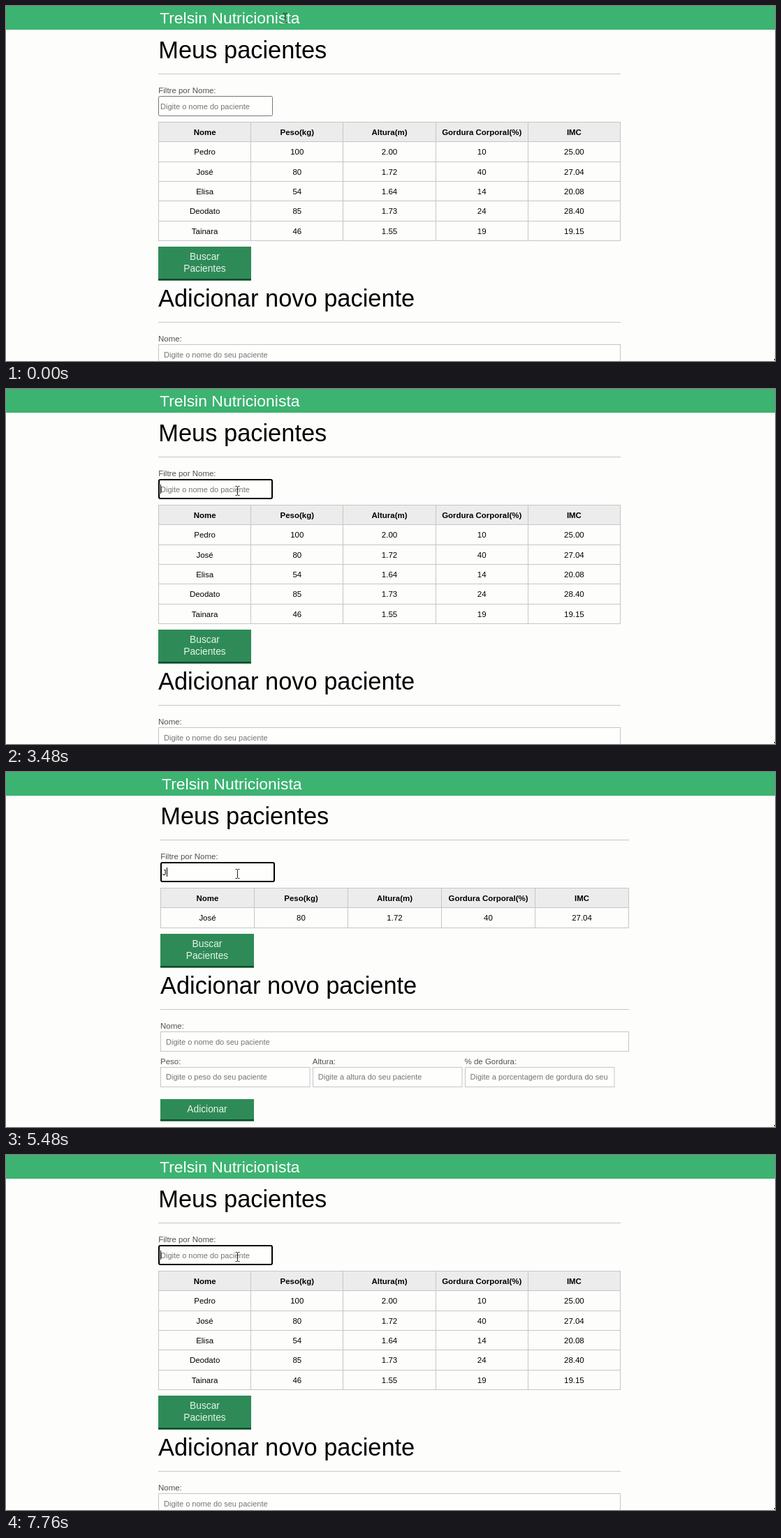
Animation, 1101 px wide and 509 px high, one loop 8 s. Source, as an HTML page:

```html
<!DOCTYPE html>
<html lang="pt-BR">
<head>
<meta charset="utf-8">
<title>Meus pacientes</title>
<style>
html, body { margin: 0; width: 100%; height: 100%; overflow: hidden; background: #fdfdfc; }
svg { display: block; font-family: "Liberation Sans", Arial, sans-serif; }
text { white-space: pre; }
</style>
</head>
<body>
<svg id="stage" width="1101" height="509" viewBox="0 0 1101 509"></svg>
<script>
const LOOP = 8000;
const BASE = 11.47;
const LINE = '#c6c6c8';
const stage = document.getElementById('stage');

const heads = ['Nome', 'Peso(kg)', 'Altura(m)', 'Gordura Corporal(%)', 'IMC'];
const patients = [
  ['Pedro', '100', '2.00', '10', '25.00'],
  ['José', '80', '1.72', '40', '27.04'],
  ['Elisa', '54', '1.64', '14', '20.08'],
  ['Deodato', '85', '1.73', '24', '28.40'],
  ['Tainara', '46', '1.55', '19', '19.15']
];

const text = (x, y, str, size = BASE, fill = '#000', extra = '') =>
  `<text x="${x}" y="${y}" font-size="${size}" fill="${fill}" ${extra}>${str}</text>`;
const middle = (x, y, str, size, fill, extra = '') =>
  text(x, y, str, size, fill, 'text-anchor="middle" ' + extra);
const rect = (x, y, w, h, fill, extra = '') =>
  `<rect x="${x}" y="${y}" width="${w}" height="${h}" fill="${fill}" ${extra}/>`;
const label = (x, y, str) => text(x, y, str, BASE, '#505050');
const hint = (x, y, str, extra) => text(x, y, str, 11, '#757575', extra);
const frame = (x, y, w, h) =>
  rect(x + .5, y + .5, w - 1, h - 1, '#fefefd', `stroke="${LINE}"`);

function button(x, y, w, h, lines) {
  return rect(x, y, w, h, '#2e8b57') + rect(x, y + h - 2.5, w, 2.5, '#0b4d2b') +
    lines.map((s, i) => middle(x + w / 2, y + 19 + i * 16.6, s, BASE * 1.2, '#e9f3ec')).join('');
}

function table(x, w, rows) {
  const colW = (w - 1) / 5;
  const rowY = i => Math.round(166 + i * 28.3);
  const bottom = rowY(rows.length + 1);
  let out = rect(x, 166, w, 28, '#ececec');
  for (let i = 0; i <= rows.length + 1; i++) out += rect(x, rowY(i), w, 1, LINE);
  for (let c = 0; c <= 5; c++) out += rect(Math.round(x + c * colW), 166, 1, bottom - 165, LINE);
  [heads, ...rows].forEach((row, i) => row.forEach((cell, c) => {
    out += middle(x + (c + .5) * colW + .5, 185 + i * 28.3, cell, BASE, '#000', i ? '' : 'font-weight="bold"');
  }));
  return out;
}

// The lower part moves up with the height of the table.
function form(x, w, btnW, dy) {
  const third = 214.5, step = 217.8;
  const fields = [
    ['Peso:', 'Digite o peso do seu paciente'],
    ['Altura:', 'Digite a altura do seu paciente'],
    ['% de Gordura:', 'Digite a porcentagem de gordura do seu paciente']
  ];
  let out = button(x, 232, btnW, 48.5, ['Buscar', 'Pacientes']) +
    text(x, 318, 'Adicionar novo paciente', BASE * 3) +
    rect(x, 340, w, 1, LINE) +
    label(x, 368, 'Nome:') + frame(x, 372, w, 29) +
    hint(x + 8, 391, 'Digite o nome do seu paciente');
  fields.forEach(([name, tip], i) => {
    const fx = x + i * step;
    out += label(fx, 419, name) + frame(Math.round(fx), 423, third, 29) +
      hint(fx + 8, 441, tip, 'clip-path="url(#field' + i + ')"') +
      `<clipPath id="field${i}">${rect(fx + 8, 423, third - 15, 29, '#000')}</clipPath>`;
  });
  out += button(x, 469, btnW, 31.5, ['Adicionar']);
  return `<g transform="translate(0 ${dy})">${out}</g>`;
}

function page(rows) {
  const full = rows.length > 1;
  const x = full ? 218 : 221, w = full ? 662 : 671;
  return rect(0, 0, 1101, 34, '#3cb371') +
    text(x + 2, 25, 'Trelsin Nutricionista', BASE * 2, '#fff') +
    text(x + .3, 75, 'Meus pacientes', BASE * 3) +
    rect(x, 97, w, 1, LINE) +
    label(x + .3, 125, 'Filtre por Nome:') +
    table(x, w, rows) +
    form(x, w, full ? 133 : 134, full ? 113 : 0) +
    rect(1100, 506, 1, 2, '#000');
}

function filterBox(x, typed, focused, caret) {
  const box = focused
    ? rect(x + 1, 130, 162, 27, '#fefefd', 'stroke="#000" stroke-width="2" rx="2"')
    : rect(x + .5, 129.5, 163, 28, '#fefefd', 'stroke="#767676" rx="2"');
  const body = typed ? text(x + 3, 147.5, typed, 11) : hint(x + 3, 147.5, 'Digite o nome do paciente');
  const advance = { P: 7.4, J: 5.5 }[typed] || 0;
  return box + body + (caret ? rect(Math.round(x + 3 + advance), 137, 1, 13, '#000') : '');
}

stage.innerHTML = rect(0, 0, 1101, 509, '#fdfdfc') + '<g id="page"></g><g id="filter"></g>' +
  '<path id="arrow" d="M0 0V14.2L3.3 11.1L5.6 16L7.8 15L5.6 10.2H10Z" fill="#fff" stroke="#111" stroke-width=".9"/>' +
  '<path id="beam" d="M-3 -6.5H-1L0 -5.8L1 -6.5H3M0 -5.8V5.8M-3 6.5H-1L0 5.8L1 6.5H3" fill="none" stroke="#222" stroke-width="1"/>';
const [pageEl, filterEl, arrow, beam] =
  ['page', 'filter', 'arrow', 'beam'].map(id => document.getElementById(id));

// Each key press restarts the blinking of the caret.
const keys = [[2440, ''], [3560, 'P'], [4400, ''], [5440, 'J'], [6480, '']];

function mouse(t) {
  if (t >= 2400) return [331.5, 146, true];
  const k = Math.min(1, Math.max(0, (t - 80) / 1300));
  const e = k * k * (3 - 2 * k);
  const x = 399.5 - 62 * e, y = 17 + 104 * e;
  return [x, y, y < 28 || (y > 45 && y < 84)];
}

let shownPage, shownFilter;
function draw(t) {
  const key = keys.filter(k => k[0] <= t).pop();
  const typed = key ? key[1] : '';
  const caret = !!key && (t - key[0]) % 1000 < 500;
  if (typed !== shownPage) {
    shownPage = typed;
    pageEl.innerHTML = page(patients.filter(p => p[0].startsWith(typed)));
  }
  const state = [typed, !!key, caret].join();
  if (state !== shownFilter) {
    shownFilter = state;
    filterEl.innerHTML = filterBox(typed ? 221 : 218, typed, !!key, caret);
  }
  const [x, y, overText] = mouse(t);
  const [on, off] = overText ? [beam, arrow] : [arrow, beam];
  on.setAttribute('transform', `translate(${x} ${y})`);
  on.style.display = '';
  off.style.display = 'none';
}

const start = performance.now();
function tick() {
  draw((performance.now() - start) % LOOP);
  requestAnimationFrame(tick);
}
tick();
</script>
</body>
</html>
```
